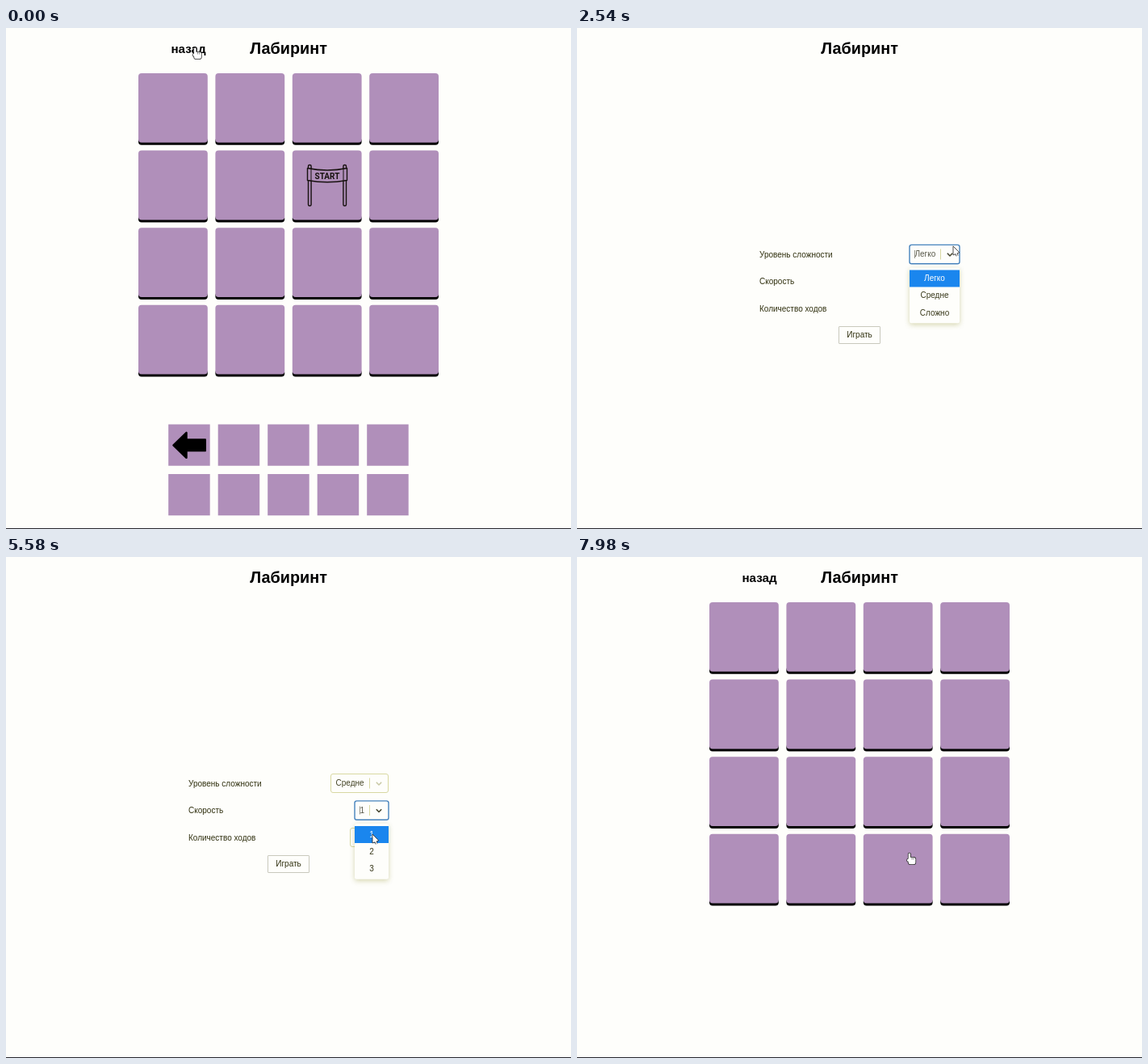
These frames come from a looping animation (700 px wide and 620 px high, 8 s). An HTML page with a canvas:

```html
<!DOCTYPE html>
<html lang="ru">
<head>
<meta charset="utf-8">
<title>Лабиринт</title>
<style>
  html, body { margin: 0; width: 100%; height: 100%; overflow: hidden; background: #fefefb; }
  canvas { display: block; }
</style>
</head>
<body>
<canvas id="stage" width="700" height="620"></canvas>
<script>
const ctx = document.getElementById('stage').getContext('2d');
const LOOP = 8000;
const SANS = '"Liberation Sans", Arial, sans-serif';
const PAPER = '#fefefb', TILE = '#b08fba', BLUE = '#1a86ee', HOVER = '#a9d0ec';
const INK = '#30300f', SOFT = '#d8d8a2', DARK = '#17110f';
const LEFT = 226, RIGHT = 474, OPTION = 21.1;

// Moments of the clicks
const CLICK = { back: 260, levelOpen: 2340, levelPick: 4020, speedOpen: 4480, speedPick: 6060, press: 7400, play: 7560 };

// Where the pointer pauses: time, x, y
const STOPS = [
  [0, 231.5, 24], [820, 352, 366], [1240, 442, 348], [1540, 466, 268], [2700, 466, 270],
  [3240, 455, 334], [3900, 447, 330], [CLICK.speedOpen, 461, 313], [5580, 454, 343],
  [CLICK.speedPick, 453, 364], [6840, 403, 370], [CLICK.press, 354, 377], [7980, 409, 366]
];

const rowY = i => 268 + i * 33.5;
const during = (t, from, to) => t >= from && t < to;

function pointerAt(t) {
  const next = STOPS.findIndex(s => s[0] > t);
  if (next < 0) return { x: STOPS.at(-1)[1], y: STOPS.at(-1)[2] };
  const [t0, x0, y0] = STOPS[next - 1], [t1, x1, y1] = STOPS[next];
  const u = (t - t0) / (t1 - t0), k = u * u * (3 - 2 * u);
  return { x: x0 + (x1 - x0) * k, y: y0 + (y1 - y0) * k };
}

function text(str, x, y, size, { color = INK, align = 'left', bold = false, family = SANS } = {}) {
  ctx.font = `${bold ? 'bold ' : ''}${size}px ${family}`;
  ctx.textAlign = align;
  ctx.fillStyle = color;
  ctx.fillText(str, x, y);
}

function paint(fill, stroke, width = 1) {
  if (fill) { ctx.fillStyle = fill; ctx.fill(); }
  if (stroke) { ctx.strokeStyle = stroke; ctx.lineWidth = width; ctx.stroke(); }
}

function box(x, y, w, h, r, fill, stroke, width) {
  ctx.beginPath();
  ctx.roundRect(x, y, w, h, r);
  paint(fill, stroke, width);
}

function poly(points, fill, stroke, width) {
  ctx.beginPath();
  points.forEach(([x, y]) => ctx.lineTo(x, y));
  if (fill) ctx.closePath();
  paint(fill, stroke, width);
}

function drawGate(cx, top) {
  const half = 24.5;
  for (const side of [-1, 1]) box(cx + side * 21.7 - 1.8, top, 3.6, 50.5, 1.5, TILE, DARK, 1.4);
  ctx.beginPath();
  ctx.moveTo(cx - half, top + 4);
  ctx.quadraticCurveTo(cx, top + 9, cx + half, top + 4);
  ctx.lineTo(cx + half, top + 19);
  ctx.quadraticCurveTo(cx, top + 23.5, cx - half, top + 19);
  ctx.closePath();
  paint(TILE, DARK, 1.4);
  for (const side of [-1, 1]) {
    const x = cx + side * 20;
    poly([[x, top + 5], [x, top + 20]], null, DARK, 1);
  }
  text('START', cx, top + 17, 10, { color: DARK, align: 'center', bold: true, family: 'Roboto, sans-serif' });
}

function drawArrow(x, y) {
  box(x + 14, y - 8, 26.5, 16, 1, '#000');
  poly([[x, y], [x + 16, y - 15.5], [x + 16, y + 15.5]], '#000', '#000', 2.5);
}

function drawBoard(started) {
  text('назад', 226, 30.5, 15.2, { color: '#000', align: 'center', bold: true });
  for (let i = 0; i < 16; i++) {
    const x = 164 + (i % 4) * 95.4, y = 56 + Math.floor(i / 4) * 95.6, size = 85.8;
    box(x, y + size - 6, size, 9, 4, '#000');
    box(x, y, size, size, 4, TILE);
  }
  if (!started) return;
  drawGate(398, 169.5);
  for (let i = 0; i < 10; i++) {
    box(201.2 + (i % 5) * 61.5, 490.4 + Math.floor(i / 5) * 61.5, 51.5, 51.4, 0, TILE);
  }
  drawArrow(207.5, 516.3);
}

function drawSelect(row, w, value, focused, caret) {
  const x = RIGHT - w, y = rowY(row);
  if (focused) box(x, y + 0.4, w, 23.4, 2.6, PAPER, '#4683bd', 1.4);
  else box(x + 0.5, y + 0.5, w - 1, 23, 2.5, PAPER, SOFT);
  text(value, x + 6.5, y + 15.4, 10, { color: focused ? '#58584a' : '#444426' });
  if (caret) poly([[x + 6.5, y + 7], [x + 6.5, y + 17]], null, '#77776a', 0.8);
  poly([[450.5, y + 5.5], [450.5, y + 18.5]], null, SOFT, 1);
  poly([[458.8, y + 10.8], [462, y + 14], [465.2, y + 10.8]], null, focused ? '#44442c' : '#c8c8a4', 1.5);
}

function drawList(row, w, options, pointer) {
  const x = RIGHT - w, y = rowY(row) + 28.5, h = OPTION * options.length + 5.5;
  ctx.save();
  ctx.shadowColor = 'rgba(120,120,0,0.3)';
  ctx.shadowBlur = 6;
  ctx.shadowOffsetY = 2;
  box(x, y, w, h, 2.5, PAPER);
  ctx.restore();
  const hovered = pointer.x >= x && pointer.x <= RIGHT ? Math.floor((pointer.y - y - 3) / OPTION) : -1;
  options.forEach((label, i) => {
    const top = y + 3 + i * OPTION, chosen = i === 0;
    if (chosen || i === hovered) box(x, top, w, OPTION, 0, chosen ? BLUE : HOVER);
    text(label, x + w / 2, top + 13.8, 10, { color: chosen ? '#fff' : '#3a3a1c', align: 'center' });
  });
}

function drawMenu(t, pointer) {
  const levelOpen = during(t, CLICK.levelOpen, CLICK.levelPick);
  const speedOpen = during(t, CLICK.speedOpen, CLICK.speedPick);
  const levelFocus = during(t, CLICK.levelOpen, CLICK.speedOpen);
  const speedFocus = during(t, CLICK.speedOpen, CLICK.press);
  const picked = t >= CLICK.levelPick;
  const blink = (t - (levelOpen ? CLICK.levelOpen : CLICK.speedOpen)) % 1060 < 530;

  ['Уровень сложности', 'Скорость', 'Количество ходов']
    .forEach((label, i) => text(label, LEFT, rowY(i) + 15.5, 10));
  drawSelect(0, picked ? 72 : 62, picked ? 'Средне' : 'Легко', levelFocus, levelOpen && blink);
  drawSelect(1, 42, t >= CLICK.speedPick ? '2' : '1', speedFocus, speedOpen && blink);
  drawSelect(2, 48, '10', false, false);
  box(324.5, 369.5, 51, 21, 0.5, PAPER, '#c9c9bd');
  text('Играть', 350, 383.4, 10, { align: 'center' });
  if (levelOpen) drawList(0, 62, ['Легко', 'Средне', 'Сложно'], pointer);
  if (speedOpen) drawList(1, 42, ['1', '2', '3'], pointer);
}

function drawArrowPointer() {
  const tail = [[3, 7], [5.2, 12]];
  poly(tail, null, '#222', 3);
  poly([[0, 0], [0, 11], [7.8, 8]], '#fff', '#222', 0.8);
  poly(tail, null, '#fff', 1.5);
}

function drawHand() {
  const parts = [[1.6, 0.5, 2.4, 10, 1.2], [1.6, 5.8, 8.8, 8.4, 2.5], [0, 7.8, 4, 3, 1.4]];
  parts.forEach(p => box(...p, null, '#222', 1.5));
  parts.forEach(p => box(...p, '#fff'));
  for (const x of [6, 8]) poly([[x, 6], [x, 8.5]], null, '#444', 0.6);
}

function draw(t) {
  const pointer = pointerAt(t);
  const onBoard = !during(t, CLICK.back, CLICK.play);
  box(0, 0, 700, 620, 0, PAPER);
  text('Лабиринт', 350, 32.2, 19.8, { color: '#000', align: 'center', bold: true });
  if (onBoard) drawBoard(t < CLICK.back);
  else drawMenu(t, pointer);
  box(0, 619, 700, 1, 0, '#26262c');

  ctx.save();
  ctx.translate(pointer.x, pointer.y);
  if (onBoard) drawHand();
  else drawArrowPointer();
  ctx.restore();
}

function tick(now) {
  draw(now % LOOP);
  requestAnimationFrame(tick);
}
ctx.lineJoin = 'round';
requestAnimationFrame(tick);
</script>
</body>
</html>
```
